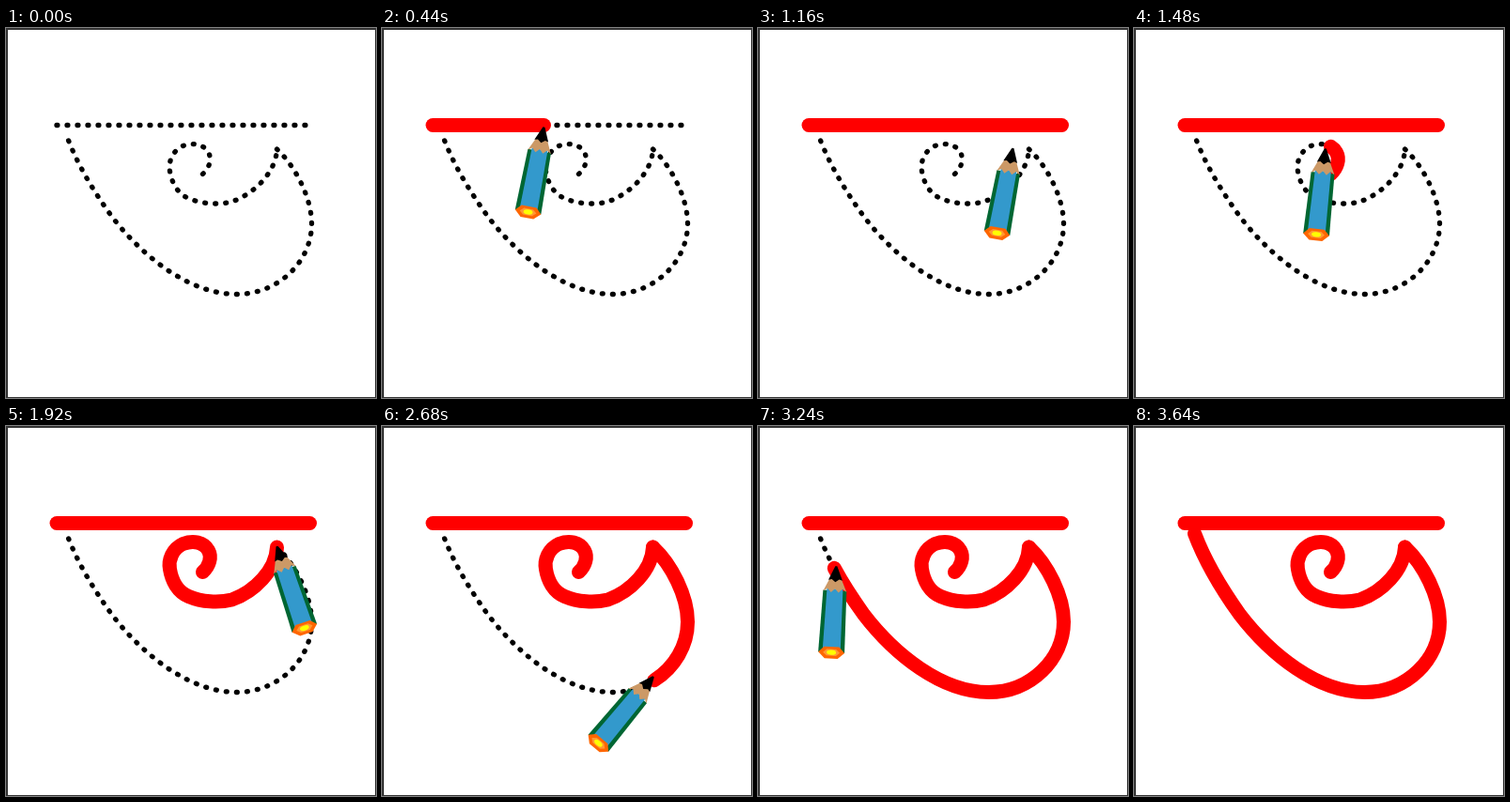
These frames come from a looping animation (394x394 px, 3.68 s). An HTML page:

```html
<!DOCTYPE html>
<html lang="en">
<head>
<meta charset="utf-8">
<title>Tracing a letter</title>
<style>
  html, body { margin: 0; width: 100%; height: 100%; overflow: hidden; background: #fff; }
  svg { display: block; width: 100%; height: 100%; }
  #dots, #ink { fill: none; stroke-linecap: round; stroke-linejoin: round; }
  #dots { stroke: #000; stroke-width: 5.3; stroke-dasharray: .08 .92; }
  #ink { stroke: #f00; stroke-width: 15; }
</style>
</head>
<body>
<svg viewBox="0 0 394 394">
  <rect x="1" y="1" width="393" height="393" fill="#fff" stroke="#333" stroke-width="2"/>
  <g transform="translate(.5 .5)">
    <g id="dots"></g>
    <g id="ink"></g>
    <g id="pencil">
      <path fill="#063" d="M-12.500 26H12.500L14 92H-14Z"/>
      <path fill="#39c" d="M-8.500 24H8.500L9.500 90H-9.500Z"/>
      <path fill="#c96" d="M-6 13H6L12.500 27L8 24L4 28L0 24L-4 28L-8 24L-12.500 27Z"/>
      <path d="M-1 0H1L7.500 15L4 14L0 17L-4 14L-7.500 15Z"/>
      <path fill="#f60" d="M-14 92L-8 86H8L14 92L7 98.500H-7Z"/>
      <path fill="#f93" d="M-9 92L-5 88.500H5L9 92L5 95.500H-5Z"/>
      <ellipse cy="92" rx="5" ry="2.600" fill="#ff0"/>
    </g>
  </g>
</svg>
<script>
const LOOP = 3680, STEP = 40, FADE_FROM = 3320, FADE_TO = 3640;
const HOPS = 6; // the pencil follows each stroke in this many straight hops

// size: length in dot spacings; nib: how far the pencil sits below the line.
const strokes = [
  { from: 40, to: 950, size: 24.5, nib: 2, d: 'M53.5 103H323' },
  { from: 1410, to: 1920, size: 22.7, nib: -1,
    d: 'M209 155C216 149 219 139 215 132C210 123 199 121 188 125C177 130 172 142 174 152' +
       'C176 164 182 176 194 181C208 187 226 188 240 184.5C264 176 287 153 288 128.5' },
  { from: 2335, to: 3325, size: 42.6, nib: -1,
    d: 'M288 128.5C308 147 325 181 325 208C325 248 290 283 245 283' +
       'C195 283 145 243 112 200C92 172 76 146 64 114' }
];

// [time, degrees]
const leans = [[1400, 10.6], [1920, -18.6], [2335, -18.6], [2680, 39.6], [2880, -27], [3325, 10.4]];

const byId = id => document.getElementById(id);
const clamp = v => Math.max(0, Math.min(1, v));
const pencil = byId('pencil');

function addPath(parent, { d, size }) {
  const path = document.createElementNS('http://www.w3.org/2000/svg', 'path');
  path.setAttribute('d', d);
  path.setAttribute('pathLength', size);
  return byId(parent).appendChild(path);
}

// Linear interpolation between rows whose first entry is the time.
function tween(rows, t) {
  const next = rows.findIndex(row => row[0] > t);
  if (next === 0) return rows[0];
  if (next < 0) return rows[rows.length - 1];
  const a = rows[next - 1], b = rows[next];
  const k = (t - a[0]) / (b[0] - a[0]);
  return a.map((v, i) => v + (b[i] - v) * k);
}

const tips = [];
for (const stroke of strokes) {
  addPath('dots', stroke);
  const ink = stroke.ink = addPath('ink', stroke);
  for (let i = 0; i <= HOPS; i++) {
    const share = i / HOPS;
    const p = ink.getPointAtLength(share * ink.getTotalLength());
    tips.push([stroke.from + share * (stroke.to - stroke.from), p.x, p.y + stroke.nib]);
  }
}

function draw(t) {
  for (const { ink, from, to, size } of strokes) {
    ink.style.visibility = t < from ? 'hidden' : 'visible';
    ink.style.strokeDasharray = `${size * clamp((t - from) / (to - from))} 99`;
  }
  const [, x, y] = tween(tips, t);
  const [, lean] = tween(leans, t);
  pencil.setAttribute('transform', `translate(${x} ${y}) rotate(${lean})`);
  pencil.style.opacity = t < STEP ? 0 : clamp((FADE_TO - t) / (FADE_TO - FADE_FROM));
}

const start = performance.now();
function tick() {
  const t = (performance.now() - start) % LOOP;
  draw(Math.floor(t / STEP) * STEP);
  requestAnimationFrame(tick);
}
tick();
</script>
</body>
</html>
```
